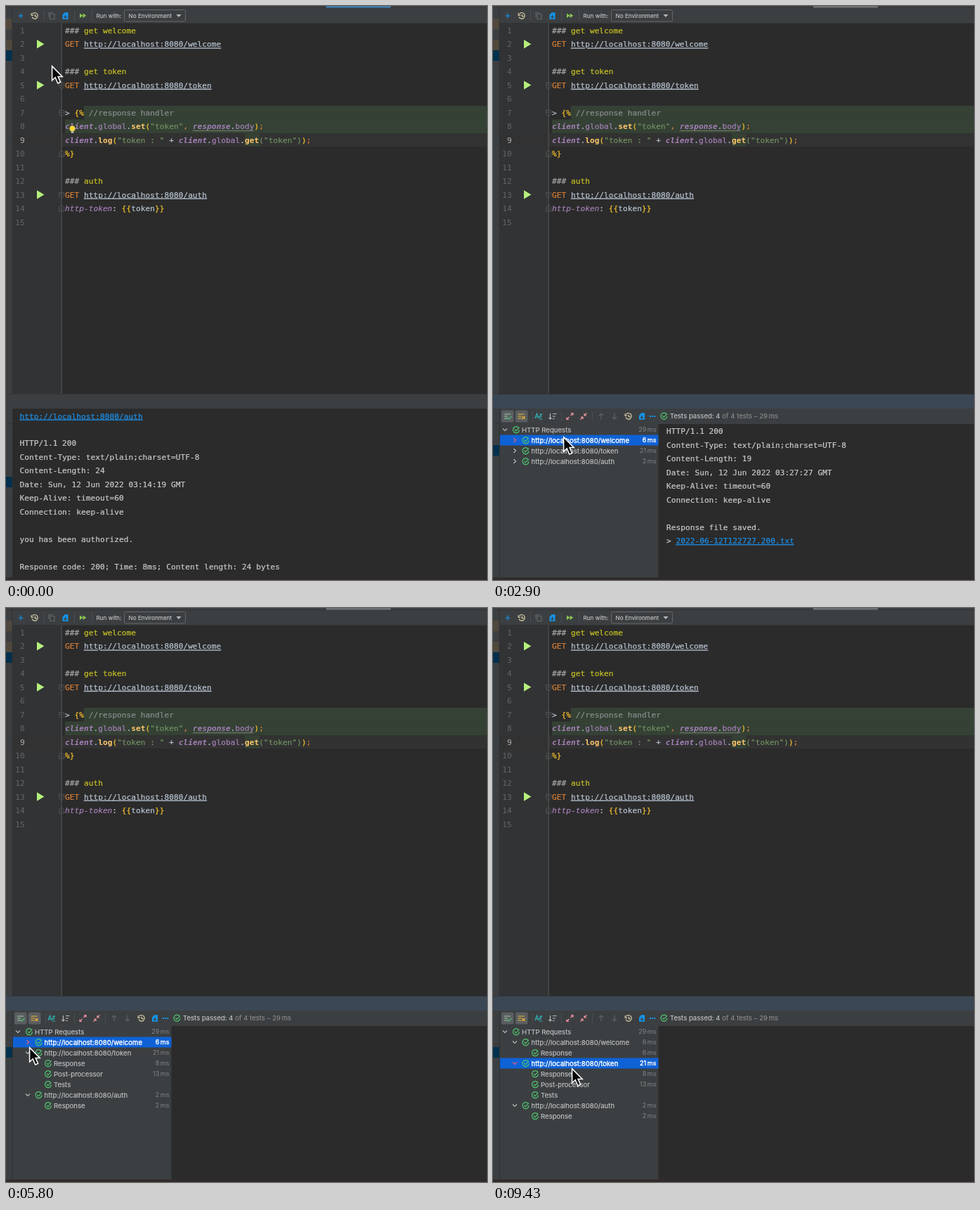
These frames come from a looping animation (685x817 px, 9.57 s). An HTML page:

```html
<!DOCTYPE html>
<html lang="en">
<head>
<meta charset="utf-8">
<title>HTTP client run</title>
<style>
html, body { margin: 0; width: 100%; height: 100%; overflow: hidden; background: #2b2b2b; }
svg { display: block; width: 685px; height: 817px; }
text { white-space: pre; }
text, tspan { fill: currentColor; stroke: currentColor; }
.m { font: 11.2px "DejaVu Sans Mono", "Noto Sans Mono", monospace; color: #b6c2d0; stroke-width: .22px; }
.out { color: #c9c9c9; }
.u { font: 9.6px Inter, Roboto, sans-serif; color: #c6c8ca; stroke-width: .12px; }
.s { font-size: 8.2px; }
.ms { font-size: 9px; color: #828587; text-anchor: end; stroke-width: 0; }
.sel { color: #fff; }
.act { stroke-width: .35px; }
.num { color: #64676a; text-anchor: end; stroke-width: 0; }
.cur { color: #b0b2b4; }
.dim { color: #8a8c8e; }
.hash { color: #a3a5a7; }
.title { color: #c5bf25; }
.kw { color: #d67f36; }
.url, .link { text-decoration: underline; text-decoration-thickness: 1px; text-underline-offset: 1.5px; }
.obj, .fn { font-weight: bold; stroke-width: 0; }
.obj, .prop, .it { color: #a37fb6; }
.obj, .it { font-style: italic; }
.fn { color: #ffc66d; }
.str { color: #6f9060; }
.br { color: #f5c02c; }
.link { color: #1c90ea; }
.l { fill: none; stroke-width: 1.2; }
</style>
</head>
<body>
<svg id="stage" viewBox="0 0 685 817" xmlns="http://www.w3.org/2000/svg"></svg>
<script>
const LOOP = 9570, STEP = 100, LINE = 19.48, ROW = 15;
const BLUE = '#1296ee', GREEN = '#4fc470', AMBER = '#edb530', GREY = '#b8babc', PINK = '#ee93a4';
const NAVY = '#03304d';

const esc = s => s.replace(/&/g, '&amp;').replace(/</g, '&lt;').replace(/>/g, '&gt;');
const rect = (x, y, w, h, fill, more = '') =>
  `<rect x="${x}" y="${y}" width="${w}" height="${h}" fill="${fill}" ${more}/>`;
const line = (d, color, more = '') => `<path class="l" d="${d}" stroke="${color}" ${more}/>`;
const shape = (d, fill) => `<path d="${d}" fill="${fill}"/>`;
const text = (x, y, cls, body) => `<text x="${x}" y="${y}" class="${cls}">${body}</text>`;
const span = (cls, s) => `<tspan class="${cls}">${esc(s)}</tspan>`;
const at = (x, y, body) => `<g transform="translate(${x} ${y})">${body}</g>`;
const lineY = n => 35 + LINE * (n - 1);

// Icons, each drawn around its own centre
const clock = line('M-3.5 -2.8A4.3 4.3 0 1 1 -4 1.6M-4.8 -3.8V-.8H-1.8M.4 -2.2V.6H2.6', '#e0d6ae');
const file = shape('M-4 -1.2L-.8 -4.8H4V4.8H-4Z', BLUE) + line('M0 -1.5V2.8M-2 1L0 3L2 1', '#3c3f41');
const check = line('M3.6 -2.6A4.5 4.5 0 1 0 4.5 .4', GREEN) + line('M-2.2 -.4L-.2 1.8L4.4 -3.2', GREEN);
const play = shape('M-4.8 -6.2L5.6 0L-4.8 6.2Z', '#b6f07c');
const forward = shape('M-4.5 -3.2L0 0L-4.5 3.2ZM0 -3.2L4.8 0L0 3.2Z', '#8ac653');
const bars = color => line('M-5 -3H4M-5 0H0M-5 3H0', color);
const fold = dir => `<path class="l" style="stroke-width:.7" fill="#2b2b2b" stroke="#606264"
  d="M-3.5 ${-4 * dir}H3.5V${1.5 * dir}L0 ${4.5 * dir}L-3.5 ${1.5 * dir}ZM-1.8 ${-dir}H1.8"/>`;
const chevron = (open, color) => line(open ? 'M-3 -1.5L0 1.5L3 -1.5' : 'M-1.5 -3L1.5 0L-1.5 3', color);

const get = path => span('kw', 'GET ') + span('url', 'http://localhost:8080/' + path);
const head = s => span('hash', '### ') + span('title', s);
const code = [
  head('get welcome'), get('welcome'), '',
  head('get token'), get('token'), '',
  esc('> ') + span('br', '{%') + span('dim', ' //response handler'),
  span('obj', 'client') + '.' + span('prop', 'global') + '.' + span('fn', 'set') + span('br', '(') +
    span('str', '"token"') + span('kw', ', ') + span('obj', 'response') + '.' + span('prop', 'body') +
    span('br', ')') + span('kw', ';'),
  span('obj', 'client') + '.' + span('fn', 'log') + span('br', '(') + span('str', '"token : "') + ' + ' +
    span('obj', 'client') + '.' + span('prop', 'global') + '.' + span('fn', 'get') +
    span('str', '("token")') + span('br', ')') + span('kw', ';'),
  span('br', '%}'), '',
  head('auth'), get('auth'),
  span('it', 'http-token') + ': ' + span('br', '{{') + 'token' + span('br', '}}'), ''
];

function wave(x0, x1, y) {
  let d = `M${x0} ${y}`;
  for (let x = x0 + 1.6, up = 1; x < x1; x += 1.6, up = !up) d += `L${x} ${y - (up ? 1.6 : 0)}`;
  return line(d, '#9a9f90', 'style="stroke-width:.8"');
}

function editor() {
  let s = rect(0, 0, 685, 817, '#2b2b2b') + rect(0, 0, 685, 24.5, '#3c3f41');
  s += rect(9, 24.5, 70, 528, '#313335') + rect(9, 181, 676, 19, '#323232');
  s += rect(111, 142, 574, 20, '#344134') + rect(84, 161.5, 601, 19.5, '#344134');
  s += rect(340, 181.5, 21, 18.5, '#344134') + rect(78.6, 24.5, 1, 528, '#555759');
  s += rect(0, 0, 9, 552, '#3c3f41') + rect(0, 18, 9, 15, '#50483c') + rect(0, 48, 9, 15, '#50483c');
  s += rect(0, 63, 9, 15, NAVY) + rect(8.6, 0, 1, 552, '#313335') + rect(0, 2, 685, 1, '#343638');
  code.forEach((body, i) => {
    const y = lineY(i + 1) + 4;
    s += text(26.8, y, 'm num' + (i === 8 ? ' cur' : ''), i + 1);
  });
  for (const n of [2, 5, 13]) s += at(48.8, lineY(n) - .3, play);
  for (const n of [5, 7, 13]) s += at(79.2, lineY(n) + .5, fold(1));
  for (const n of [10, 14]) s += at(79.2, lineY(n), fold(-1));
  code.forEach((body, i) => s += text(84, lineY(i + 1) + 4, 'm', body));
  return s + wave(266, 354, lineY(8) + 7);
}

function toolbar(hover) {
  let s = hover ? rect(101.5, 5.5, 16, 16, '#4f5355', 'rx="2"') : '';
  s += line('M17.5 14H24.5M21 10.5V17.5', BLUE) + at(41, 14, clock);
  s += at(65, 14, line('M-2 -2.5H4V4.5H-2ZM-4 2V-4.5H2', '#626567'));
  s += at(84.5, 14, file) + at(109.5, 13.8, forward);
  for (const x of [53, 97, 122]) s += rect(x, 6, 1, 15, '#4b4e50');
  s += text(128.5, 16.8, 'u s', 'Run with:');
  s += rect(168.5, 5.5, 87, 16.5, '#3c3f41', 'rx="2" stroke="#646668"');
  return s + text(174.5, 16.8, 'u s', 'No Environment') + shape('M242.5 12H249.5L246 16Z', GREY);
}

function testBar() {
  let s = rect(0, 573, 685, 22, '#3c3f41');
  for (const x of [12, 32]) s += rect(x, 575.5, 17.5, 17, '#5a5e61', 'rx="2"');
  s += at(21, 584, bars('#9fc4a4') + line('M-.5 2L1.5 4L5.5 0', GREEN));
  s += at(40.5, 584, bars(AMBER) + line('M1 0L5 4M5 0L1 4', AMBER));
  s += at(65, 584, line('M-5 3L-2.5 -4L0 3M-4 1H-1M1 -3H4.5L1 1H4.5M1 4H5', '#30b4b8'));
  s += at(85, 584, line('M-3.5 -4V4M-5.5 2L-3.5 4L-1.5 2M0 -3.5H5.5M0 0H4M0 3.5H2.5', GREY));
  s += at(109.5, 584, line('M1 -1L4.5 -4.5M1.5 -4.5H4.5V-1.5M-1 1L-4.5 4.5M-4.5 1.5V4.5H-1.5', PINK));
  s += at(129, 584, line('M4.5 -4.5L1 -1M1 -4V-1H4M-4.5 4.5L-1 1M-4 1H-1V4', PINK));
  s += at(154, 584, line('M0 4.5V-4M-3 -1L0 -4L3 -1', '#5f6264'));
  s += at(173, 584, line('M0 -4.5V4M-3 1L0 4L3 1', '#5f6264'));
  s += at(193, 584, clock) + at(212, 584, file);
  for (const x of [223, 226.2, 229.4]) s += rect(x, 583, 2, 2, BLUE);
  for (const x of [56, 97, 141]) s += rect(x, 577, 1, 14, '#4b4e50');
  s += at(243.5, 583.5, check);
  return s + text(252, 587, 'u', 'Tests passed: 4' + span('dim', ' of 4 tests – 29\u2009ms'));
}

// Tree rows: id, depth, label, milliseconds, open
function treeRows(open) {
  const host = 'http://localhost:8080/';
  const rows = [['root', 0, 'HTTP Requests', 29, true]];
  const add = (name, ms, kids) => {
    rows.push([name, 1, host + name, ms, !!open[name]]);
    if (open[name]) for (const [k, t] of kids) rows.push([name + k, 2, k, t]);
  };
  add('welcome', 6, [['Response', 6]]);
  add('token', 21, [['Response', 8], ['Post-processor', 13], ['Tests', 0]]);
  add('auth', 2, [['Response', 2]]);
  return rows;
}

function tree(open, selected, focused) {
  let s = rect(9.5, 595, 226, 222, '#3c3f41') + rect(235.3, 595, 1, 222, '#323232');
  treeRows(open).forEach(([id, depth, label, ms, isOpen], i) => {
    const y = 603 + ROW * i, on = id === selected;
    const cls = on ? (focused ? ' sel act' : ' sel') : '';
    if (on) s += rect(9.5, y - 7.5, 226, ROW, focused ? '#0f62d6' : NAVY);
    if (depth < 2) s += at(17 + 14 * depth, y, chevron(isOpen, on && focused ? '#e0607a' : GREY));
    s += at(33 + 13.5 * depth, y, check) + text(41 + 13.5 * depth, y + 3.5, 'u' + cls, label);
    if (ms) s += text(232.5, y + 3.3, 'u ms' + cls, ms + '\u2009ms');
  });
  return s;
}

const headers = (size, time) => ['HTTP/1.1 200', 'Content-Type: text/plain;charset=UTF-8',
  'Content-Length: ' + size, `Date: Sun, 12 Jun 2022 ${time} GMT`, 'Keep-Alive: timeout=60',
  'Connection: keep-alive', ''];
const saved = (size, name) => [...headers(size, '03:27:27'), 'Response file saved.',
  esc('> ') + span('link', name + '.200.txt')];
const welcomeOut = saved(19, '2022-06-12T122727');
const tokenOut = saved(36, '2022-06-12T122727-1');
const authOut = [span('link', 'http://localhost:8080/auth'), '', ...headers(24, '03:14:19'),
  'you has been authorized.', '', 'Response code: 200; Time: 8ms; Content length: 24 bytes'];
const scriptOut = ['token : 5b0c7d1e-42af-4c96-9e38-d07a61f2c8b4'];
const printOut = (x, y, rows) =>
  rows.map((r, i) => text(x, y + 4 + LINE * i, 'm out', r)).join('');

// Selection over time: start, row, console text
const picks = [
  [0, 'root', ['', 'Testing started at 12:27 PM ...', ...welcomeOut]],
  [2600, 'welcome', welcomeOut],
  [4100, 'token', tokenOut],
  [5700, 'welcome', []],
  [6500, 'welcomeResponse', welcomeOut],
  [7000, 'tokenPost-processor', scriptOut],
  [7600, 'tokenResponse', tokenOut],
  [8900, 'token', []]
];
const RUN = 1200, RESULTS = 1500, FOCUS = 2600;

function panel(t) {
  const focused = t >= FOCUS, results = t >= RESULTS;
  let s = rect(456, 0, 92, 2.6, focused ? '#6f7375' : '#417ead');
  s += rect(0, 552, 685, 21, focused ? '#3b4754' : '#3c3f41') + rect(0, 552, 685, 1, '#343638');
  if (results) {
    const [, row, out] = picks.filter(p => p[0] <= t).pop();
    const open = { auth: t >= 5100, token: t >= 5400, welcome: t >= 5900 };
    s += testBar() + tree(open, row, focused) + printOut(247, 605.3, out);
  } else {
    s += printOut(19.5, 583.5, authOut);
  }
  s += rect(0, 573, 9, 244, '#3c3f41') + rect(0, 594, 9, 1, '#323537');
  s += rect(0, results ? 625 : 670, 9, 15, NAVY) + rect(8.8, 573, 1, 244, '#313335');
  return s + rect(0, 813.5, 685, 3.5, '#302a2b');
}

function details(t) {
  let s = toolbar(t >= 900 && t < 2200);
  if (t < RUN) {
    s += at(94.5, 174.5, `<circle r="4" fill="#f2d93a"/>` + rect(-1.8, 4, 3.6, 2.2, '#c9c9c9'));
  }
  if (t < FOCUS && t % 1000 >= 500) s += rect(353.2, 182.5, 1.4, 17, '#d0d0d0');
  return s;
}

// Pointer path: time, x, y
const path = [
  [0, 65, 85], [200, 65, 85], [900, 111.5, 11.5], [2100, 111.5, 11.5], [2600, 100, 613],
  [3100, 100, 613], [3800, 128, 630], [4300, 129, 638], [4500, 129, 640], [5000, 32, 645],
  [5200, 32, 643], [5400, 31, 630], [5800, 33, 625], [6100, 33, 619], [6500, 85, 632],
  [7000, 115, 674], [7300, 117, 674], [7600, 121, 666], [8400, 121, 667],
  [8900, 112, 647], [9200, 112, 655], [LOOP, 112, 655]
];
function pointer(t) {
  const i = path.findIndex(p => p[0] > t), [t0, x0, y0] = path[i - 1], [t1, x1, y1] = path[i];
  const k = (t - t0) / (t1 - t0), e = k * k * (3 - 2 * k);
  return `translate(${x0 + (x1 - x0) * e} ${y0 + (y1 - y0) * e})`;
}

const stage = document.getElementById('stage');
stage.innerHTML = editor() + '<g id="panel"></g><g id="details"></g>' +
  '<path id="pointer" d="M.6 .6V21L5.2 16.8L8.8 25L12.6 23.4L9.1 15.4H15.2Z" ' +
  'fill="#050505" stroke="#fff" stroke-width="1.5"/>';
const [panelEl, detailsEl, pointerEl] = ['panel', 'details', 'pointer'].map(id => document.getElementById(id));

let last = -1;
function draw(now) {
  const t = Math.floor(now % LOOP / STEP) * STEP;
  if (t !== last) {
    panelEl.innerHTML = panel(t);
    detailsEl.innerHTML = details(t);
    pointerEl.setAttribute('transform', pointer(t));
    last = t;
  }
}
const start = performance.now();
function tick() {
  draw(performance.now() - start);
  requestAnimationFrame(tick);
}
tick();
</script>
</body>
</html>
```
